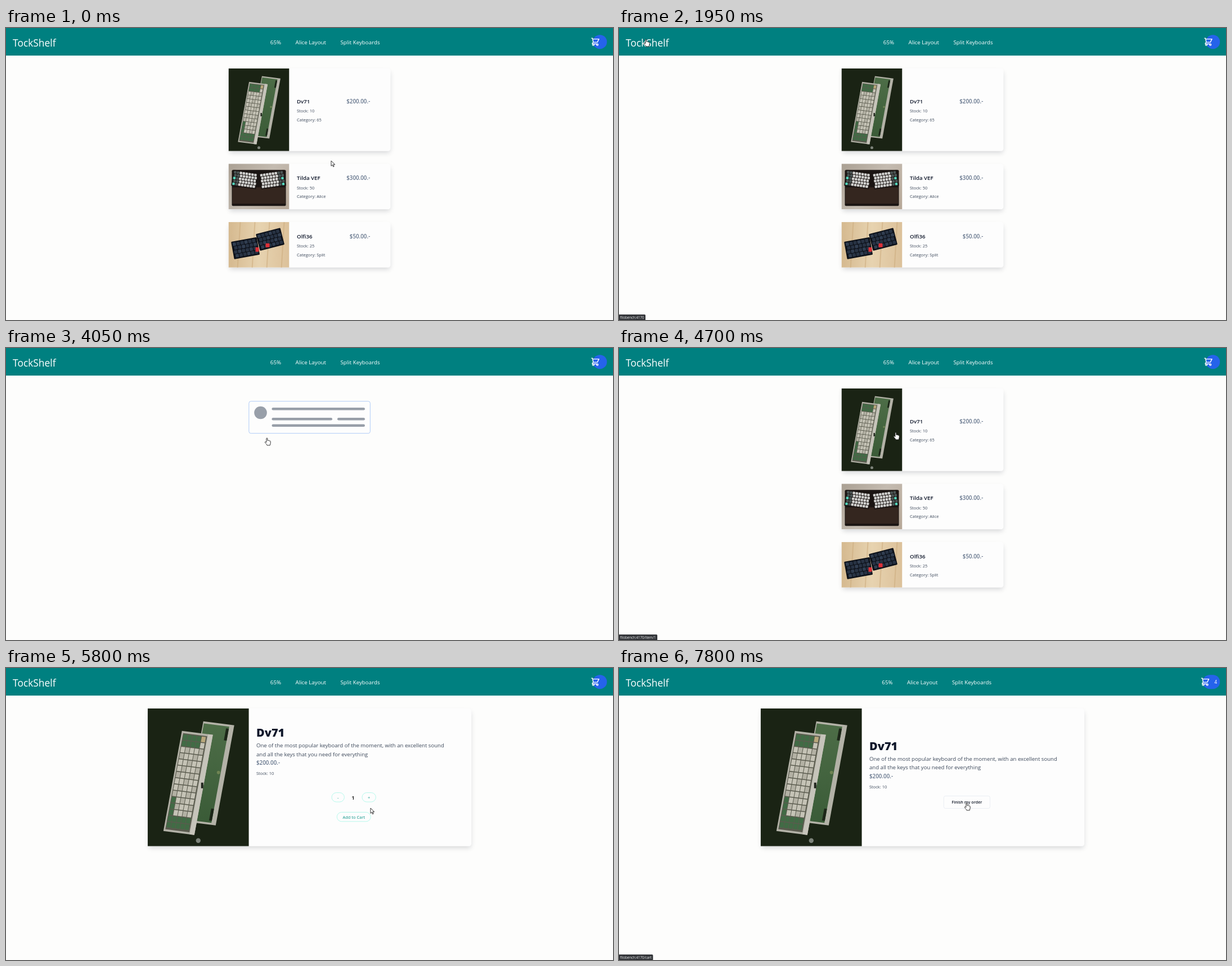
Animation, 1079 px wide and 519 px high, one loop 8 s. Source, as an HTML page with a canvas:

```html
<!DOCTYPE html>
<html lang="en">
<head>
<meta charset="utf-8">
<title>Keyboard shop</title>
<style>
html, body { margin: 0; width: 100%; height: 100%; overflow: hidden; background: #fdfdfc; }
canvas { display: block; width: 100vw; height: 100vh; }
</style>
</head>
<body>
<canvas id="stage" width="1079" height="519"></canvas>
<script>
const ctx = document.getElementById('stage').getContext('2d');
const W = 1079, H = 519, LOOP = 8000, STEP = 50;
const TOP = 71.8, GAP = 22.5;
const PAGE = '#fdfdfc', CARD = '#fdfdfd', INK = '#0f172a', SLATE = '#64748b', BODY = '#3d495b', TEAL = '#0d9488';
const HOST = 'filobench:4170';
const ADDED = 7000;

const products = [
  { name: 'Dv71', price: '$200.00.-', stock: 10, category: '65', h: 147, scale: 0.6, photo: tallPhoto },
  { name: 'Tilda VEF', price: '$300.00.-', stock: 50, category: 'Alice', h: 81, scale: 1, photo: deskPhoto },
  { name: 'Olfi36', price: '$50.00.-', stock: 25, category: 'Split', h: 81, scale: 1, photo: woodPhoto }
];
products.forEach((p, i) => {
  const above = products[i - 1];
  p.y = above ? above.y + above.h + GAP : TOP;
});

// Scenes in order, each from its start time
const scenes = [
  [0, 'list'], [2600, 'blank'], [3050, 'loading'], [4100, 'list'], [5100, 'loading'], [5650, 'detail']
];
// Pointer moves: start, end, x, y; it rests in between
const moves = [
  [0, 0, 578, 236], [50, 750, 341, 391], [1100, 1900, 48, 20], [1950, 2050, 52, 21],
  [2600, 3150, 101, 54], [3150, 4050, 464, 160], [4100, 4700, 492, 150], [4900, 5800, 648, 249],
  [5800, 5950, 644, 226], [6600, 6850, 618, 262], [7100, 7500, 618, 237], [7650, 7800, 618, 240]
];
const logoBox = [12, 17, 79, 20], plusBox = [633, 221.6, 24.4, 16.4];
const minusBox = [579, 221.6, 22.4, 16.4], addBox = [588.3, 256.4, 60, 16.4], finishBox = [577.3, 227.5, 82.2, 22];

const cartIcon = new Path2D('M3 3h2l.4 2M7 13h10l4-8H5.4M7 13L5.4 5M7 13l-2.293 2.293c-.63.63-.184 1.707.707 1.707H17m0 0a2 2 0 100 4 2 2 0 000-4zm-8 2a2 2 0 11-4 0 2 2 0 014 0z');
const arrow = new Path2D('M0 0V16.5L4 13L6.6 19L9.2 17.9L6.6 12H12Z');
const hand = new Path2D('M-2 2C-2-.7 1.6-.7 1.6 2V8C2.5 6.8 4.6 7 5 8.6C6 7.6 8 8 8.3 9.6C9.6 8.8 11 9.5 11 11V16C11 18.5 9.5 20 9.3 23H0C-.5 20.5-3.4 18-6 14.5C-7.4 12.4-5.2 10.8-3.6 12.2L-2 13.8Z');

const within = (t, a, b) => t >= a && t < b;
const clamp = (v, lo, hi) => Math.min(hi, Math.max(lo, v));
const smooth = k => k * k * (3 - 2 * k);
const sceneAt = t => scenes.filter(s => t >= s[0]).pop();

function setFont(size, weight = 400) {
  ctx.font = `${weight} ${size}px "Open Sans", "Noto Sans", sans-serif`;
}

function text(s, x, y, size, color, weight, align = 'left') {
  setFont(size, weight);
  ctx.textAlign = align;
  ctx.fillStyle = color;
  ctx.fillText(s, x, y);
}

function box(x, y, w, h, r, fill, stroke, line = 0.7) {
  ctx.beginPath();
  ctx.roundRect(x, y, w, h, r);
  if (fill) { ctx.fillStyle = fill; ctx.fill(); }
  if (stroke) { ctx.strokeStyle = stroke; ctx.lineWidth = line; ctx.stroke(); }
}

function dot(x, y, r, fill) {
  box(x - r, y - r, 2 * r, 2 * r, r, fill);
}

function place(x, y, scale, draw, angle = 0) {
  ctx.save();
  ctx.translate(x, y);
  ctx.rotate(angle);
  ctx.scale(scale, scale);
  draw();
  ctx.restore();
}

function blend(x, y, ...colors) {
  const g = ctx.createLinearGradient(0, 0, x, y);
  colors.forEach((c, i) => g.addColorStop(i / (colors.length - 1), c));
  return g;
}

function backdrop(w, h, fill) {
  ctx.beginPath();
  ctx.rect(0, 0, w, h);
  ctx.clip();
  ctx.fillStyle = fill;
  ctx.fillRect(0, 0, w, h);
}

function keys(x, y, angle, cols, rows, step, base, color) {
  place(x, y, step, () => {
    box(-0.3, -0.3, cols + 0.6, rows + 0.5, 0.2, base);
    for (let r = 0; r < rows; r++)
      for (let c = 0; c < cols; c++)
        box(c + (r % 2) * 0.2, r, 0.84, 0.84, 0.15, color(c, r));
  }, angle);
}

// Slanted board drawn in a unit square
function board(x, y, draw) {
  ctx.save();
  ctx.transform(55, 7, -33, 178, x, y);
  box(0, 0, 1, 1, 0, '#b3b2a7');
  draw();
  ctx.restore();
}

function tallPhoto() {
  backdrop(180, 245, '#1a2314');
  board(99, 23, () => {
    box(0.03, 0.02, 0.82, 0.96, 0, blend(0, 1, '#4d6d47', '#3a5b37'));
    for (const y of [0.04, 0.84]) box(0.76, y, 0.09, 0.12, 0, '#1c2618');
  });
  dot(126, 114, 3, '#6f8453');
  board(61, 40, () => {
    box(0.85, 0, 0.15, 1, 0, '#c6c4ba');
    box(0.05, 0.02, 0.78, 0.96, 0, '#5a5b4e');
    const rows = 15, cols = 5;
    for (let r = 0; r < rows; r++)
      for (let c = 0; c < cols; c++) {
        const corner = r < 2 && c < 4 || r > 9 && c === 0 || r > 12;
        const color = corner ? '#416b45' : r === 0 ? '#b9a87c' : (r + c) % 3 ? '#c5c3b6' : '#b3b1a4';
        box(0.07 + c * 0.148, 0.03 + r * 0.0625, 0.13, 0.054, 0, color);
      }
  });
  box(95, 132, 4, 10, 0, '#20251d');
  dot(90, 235, 4.2, '#7d837a');
}

function deskPhoto() {
  backdrop(108, 81, blend(108, 81, '#aaa093', '#c4bbb0', '#b6a797'));
  box(6, 11, 96, 64, 2, '#1b1513');
  box(7, 42, 94, 29, 1, '#34261f');
  const tone = edge => (c, r) =>
    Math.abs(c - edge) > 1 ? '#d2d2d0' : c === edge && r % 2 === 0 && r ? '#55d6bd' : '#4c5656';
  keys(10, 12.5, 0.14, 8, 5, 5.2, '#1b1513', tone(0));
  keys(56, 18.5, -0.14, 8, 5, 5.2, '#1b1513', tone(7));
}

function woodPhoto() {
  backdrop(108, 81, blend(108, 0, '#d5b98f', '#e7d3b0', '#dcc19a'));
  for (let x = -6; x < 108; x += 26) place(x, 0, 1, () => box(0, 0, 2, 90, 0, '#cba97b88'), 0.06);
  const navy = (c, r) => (c + r) % 3 ? '#273243' : '#303d50';
  keys(7, 37, -0.18, 6, 4, 7, '#0d1119', navy);
  keys(51, 23, -0.25, 6, 4, 6.8, '#0d1119', navy);
  box(48, 45, 6, 8, 1, '#dc3038');
  box(66, 38, 7, 7, 1, '#dc3038');
}

function card(y, w, h, p, scale) {
  const x = (W - w) / 2;
  ctx.save();
  ctx.shadowColor = 'rgba(15,23,42,.17)';
  ctx.shadowBlur = 9;
  ctx.shadowOffsetY = 4;
  box(x + 2, y + 2, w - 3, h - 3, 4, PAGE);
  ctx.restore();
  box(x, y, w, h, [0, 4.5, 4.5, 0], CARD);
  place(x, y, scale, p.photo);
}

function header(count) {
  ctx.fillStyle = '#008080';
  ctx.fillRect(0, 0, W, 49);
  text('TockShelf', 12, 32.6, 17.4, '#fff');

  const nav = ['65%', 'Alice Layout', 'Split Keyboards'], gap = 25.5;
  setFont(9.75);
  const widths = nav.map(s => ctx.measureText(s).width);
  let x = (count ? 564.7 : 567.2) - (widths.reduce((a, b) => a + b) + 2 * gap) / 2;
  nav.forEach((s, i) => {
    text(s, x, 28.6, 9.75, '#fff');
    x += widths[i] + gap;
  });

  const w = count ? 30.5 : 25;
  box(1068.2 - w, 12.2, w, 25, 12.5, '#2563eb');
  place(1059.6 - w + 4.2 - 8.6 + 8, 16, 0.72, () => {
    ctx.strokeStyle = '#fff';
    ctx.lineWidth = 2;
    ctx.lineCap = ctx.lineJoin = 'round';
    ctx.translate(1, 0);
    ctx.stroke(cartIcon);
  });
  if (count) text(count, 1058.3, 28, 8.6, '#fff');
}

function list() {
  for (const p of products) {
    const mid = p.y + p.h / 2;
    card(p.y, 288, p.h, p, p.scale);
    text(p.name, 517, mid - 11.8, 9.7, INK, 600);
    text(p.price, 647.3, mid - 11.8, 9.8, SLATE, 600, 'right');
    text('Stock: ' + p.stock, 517, mid + 5, 7.5, BODY);
    text('Category: ' + p.category, 517, mid + 20.6, 7.5, BODY);
  }
}

function skeleton(age) {
  const left = 472.5, right = 638;
  const bar = (x, y, end) => box(x, y, end - x, 4.5, 2.25, '#334155');
  box(431.8, 94.7, 215.6, 57, 3.5, CARD, '#a9c7f6', 0.9);
  ctx.save();
  ctx.globalAlpha = 0.75 + 0.25 * Math.cos(age / 1000 * Math.PI);
  dot(452.5, 115, 11.3, '#334155');
  bar(left, 106, right);
  bar(left, 124.1, 580);
  bar(589, 124.1, right);
  bar(left, 135.4, right);
  ctx.restore();
}

function button([x, y, w, h], r, border, label, size, color, weight) {
  box(x, y, w, h, r, CARD, border);
  text(label, x + w / 2, y + h / 2 + size * 0.39, size, color, weight, 'center');
}

function detail(qty, added) {
  const p = products[0], y = TOP + (added ? 23.5 : 0), x = 445;
  card(TOP, 575.5, 245, p, 1);
  text(p.name, x, y + 50.2, 20, INK, 800);
  text('One of the most popular keyboard of the moment, with an excellent sound', x, y + 69.2, 9.6, BODY);
  text('and all the keys that you need for everything', x, y + 85, 9.6, BODY);
  text(p.price, x, y + 100.6, 9.8, SLATE, 600);
  text('Stock: ' + p.stock, x, y + 118.2, 7.5, BODY);
  if (added) {
    button(finishBox, 3, '#e2e8f0', 'Finish my order', 7.2, '#111827', 600);
    return;
  }
  button(minusBox, 8.2, '#99f6e4', '-', 7.5, TEAL, 500);
  text(qty, 617, 233.6, 9.7, '#000', 600, 'center');
  button(plusBox, 8.2, '#99f6e4', '+', 7.5, TEAL, 500);
  button(addBox, 8.2, '#99f6e4', 'Add to Cart', 7.5, TEAL, 500);
}

function status(t) {
  const url = within(t, 1850, 3250) ? HOST
    : within(t, 4150, 5150) ? HOST + '/item/1'
    : t >= 7700 ? HOST + '/cart' : '';
  if (!url) return;
  setFont(6.2);
  box(0, 509.3, ctx.measureText(url).width + 4.5, 10, [0, 1.5, 0, 0], '#303236');
  text(url, 2, 517.3, 6.2, '#f1f3f4');
}

function links(t) {
  const scene = sceneAt(t)[1];
  if (scene === 'list') return [logoBox, ...products.map(p => [395.5, p.y, 288, p.h])];
  if (scene === 'detail') return [logoBox, ...(t < ADDED ? [minusBox, plusBox, addBox] : [finishBox])];
  return [logoBox];
}

function pointer(t) {
  let [, , x, y] = moves[0];
  for (const [start, end, tx, ty] of moves.slice(1)) {
    const e = smooth(clamp((t - start) / (end - start), 0, 1));
    x += (tx - x) * e;
    y += (ty - y) * e;
  }
  // The pointer changes one step before the page repaints
  const over = links(t + STEP).some(([bx, by, w, h]) => within(x, bx, bx + w) && within(y, by, by + h));
  const shape = over ? hand : arrow;
  place(x, y, 0.5625, () => {
    ctx.fillStyle = '#fff';
    ctx.strokeStyle = '#111';
    ctx.lineWidth = 1.5;
    ctx.lineJoin = 'round';
    ctx.fill(shape);
    ctx.stroke(shape);
  });
}

function render(t) {
  const [since, scene] = sceneAt(t), added = t >= ADDED;
  ctx.fillStyle = PAGE;
  ctx.fillRect(0, 0, W, H);
  if (scene === 'list') list();
  if (scene === 'loading') skeleton(t - since);
  if (scene === 'detail') detail(1 + clamp(Math.floor((t - 5900) / 200), 0, 3), added);
  header(added ? 4 : 0);
  status(t);
  pointer(t);
}

const start = performance.now();
function tick() {
  const t = (performance.now() - start) % LOOP;
  render(Math.floor(t / STEP) * STEP);
  requestAnimationFrame(tick);
}
tick();
</script>
</body>
</html>
```
